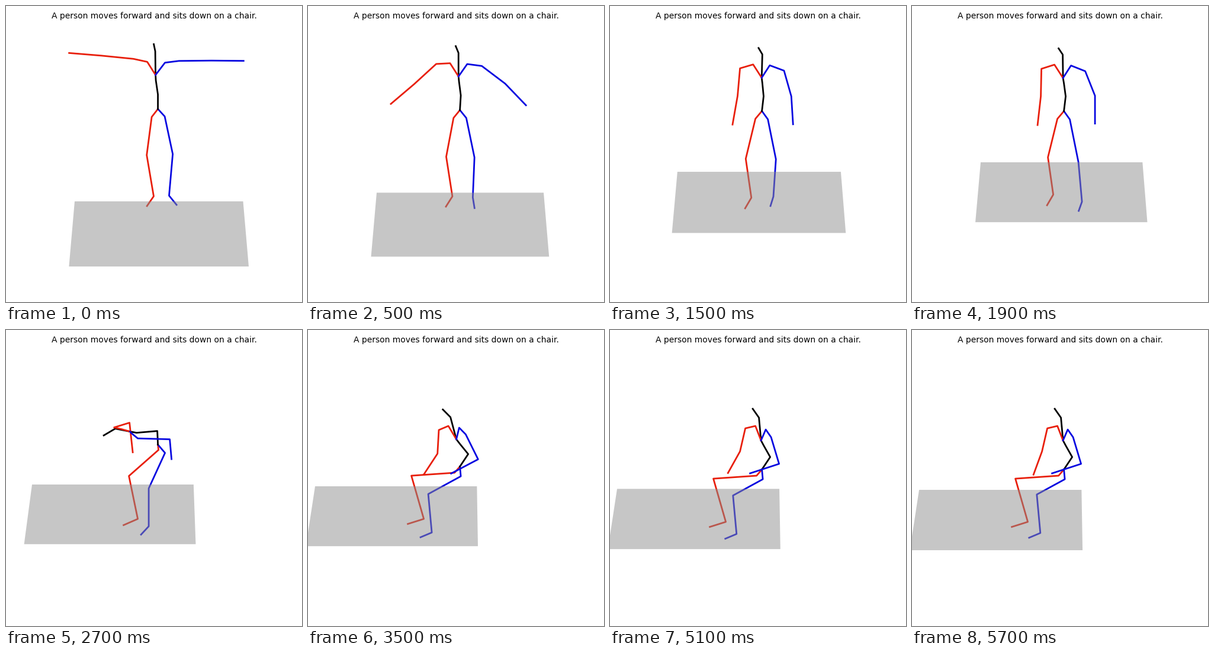
A matplotlib script for the animation above (5900 ms loop, 500x500 px).

```python
import matplotlib.pyplot as plt
import numpy as np
from matplotlib.animation import FuncAnimation

RED, BLUE, BLACK = "#e81e0a", "#0606e0", "black"
ROOT, CHEST = 0, 11
CHAINS = [
    ([ROOT, 1, 2, 3, 4], RED),
    ([ROOT, 5, 6, 7, 8], BLUE),
    ([ROOT, 9, 10, 11, 12, 13], BLACK),
    ([CHEST, 14, 15, 16, 17], RED),
    ([CHEST, 18, 19, 20, 21], BLUE),
]
LINKS = [link for chain, _ in CHAINS for link in zip(chain, chain[1:])]

# Bone columns, in chain order
R_LEG, L_LEG, SPINE, UPPER_BODY = slice(1, 3), slice(5, 7), slice(9, 13), slice(9, 21)
L_THIGH, L_SHIN, R_FOREARM, L_UPPER_ARM = 5, 6, 16, 19

STEPS = 30
t = np.arange(STEPS)


def ramp(start, end):
    return np.clip((t - start) / (end - start), 0, 1)


def smooth(u):
    return u * u * (3 - 2 * u)


def bump(center, half):
    return np.cos(np.pi / 2 * np.clip((t - center) / half, -1, 1)) ** 2


def mirrored(limb, roll):
    """Right and left limb from one left limb, both tilted by roll."""
    limb = np.array(limb)
    tilt = np.exp(1j * roll)
    return [*(-limb.conj() * tilt)], [*(limb * tilt)]


# A pose lists each bone as a step x + yj from its parent joint.
def spread():
    r_leg, l_leg = mirrored([11+13j, 11+64j, -9+70j, 12+16j], -0.04)
    r_arm, l_arm = mirrored([15-21.5j, 23.5-4j, 54.5-3j, 54.5-2j], 0.045)
    spine = [-24.5j, -3.5-24j, -0.5-9j, -0.5-40j, -2.5-12j]
    return r_leg + l_leg + spine + r_arm + l_arm


stand = [
    -11+13j, -16+65j, 9+63j, -10.5+18j,
    10+14j, 14.5+72j, 6+67j, -5.5+15.5j,
    3-25j, -3-22j, -1.5-9j, -0.5-39.5j, -7-10.5j,
    -14.5-22.5j, -22+7j, -1+46.5j, -5.5+48.5j,
    13.5-21j, 24+9.5j, 16.5+41.5j, 47j]
bend = [
    1+9j, -50+44j, 15+72.5j, -24+10.5j,
    12+14j, -27.5+60j, 64j, -13+14j,
    -1-23j, -35+3j, -11-2j, -25-5j, -19.5+11.5j,
    -14-4j, -13-3j, 26-8j, 5.5+50j,
    2+2.5j, 11+9j, 54+1.5j, 3+33.5j]
sit = [
    -9+10.5j, -73+5j, 21+73j, -27+8.5j,
    1.5+16.5j, -55+30j, 6+65j, -19+8j,
    14-21j, -11-19.5j, -4.5-8.5j, -3.5-38.5j, -10.5-15j,
    -9.5-24.5j, -17+4j, -9+39j, -28.5+30.5j,
    8-18.5j, 9+13j, 13.5+45j, -49+16j]

POSES = np.array([spread(), stand, bend, sit])
ROOT_Y = np.array([174, 177.6, 193.6, 235.6])

arms_down = 1 - (1 - ramp(0, 10)) ** 2
progress = arms_down + smooth(ramp(10, 14)) + smooth(ramp(14, 18))
stride = bump(6, 4)
slump = bump(18, 4)
settle = smooth(ramp(22, 29))


def blend(values):
    """Values of the four poses mixed along the progress curve."""
    i = np.minimum(progress.astype(int), len(values) - 2)
    u = progress - i
    u = u.reshape(-1, *[1] * (values.ndim - 1))
    return values[i] * (1 - u) + values[i + 1] * u


def animate_joints():
    angle = blend(np.unwrap(np.angle(POSES), axis=0))
    length = blend(np.abs(POSES))

    # Step forward: weight on the right leg, left leg lifted
    length[:, R_LEG] *= 1 + 0.08 * stride[:, None]
    length[:, L_LEG] *= 1 - 0.12 * stride[:, None]
    angle[:, SPINE] += 0.08 * stride[:, None]
    angle[:, [L_SHIN, L_UPPER_ARM]] += 0.3 * stride[:, None]

    # Slump on landing, then small shifts on the seat
    angle[:, UPPER_BODY] -= 0.17 * slump[:, None]
    angle[:, R_FOREARM] -= 0.4 * settle
    length[:, L_THIGH] *= 1 - 0.14 * settle

    bones = length * np.exp(1j * angle)
    joints = np.zeros((STEPS, len(LINKS) + 1), complex)
    joints[:, ROOT] = 256.6 + 1j * (blend(ROOT_Y) - 5 * slump)
    for n, (a, b) in enumerate(LINKS):
        joints[:, b] = joints[:, a] + bones[:, n]
    return joints


def floor_corners(left, top):
    """Near edge is the far edge scaled about the vanishing column."""
    rise = top - 262
    right = left + 273 + 0.169 * rise
    scale = 1.0625 + 0.00007 * rise
    bottom = 362.9 + 1.134 * rise
    near = [259 + scale * (x - 259) for x in (right, left)]
    return [(left, top), (right, top), (near[0], bottom), (near[1], bottom)]


joints = animate_joints()
floor_left = 116 - 8.5 * bump(6, 3) - 104 * (1 - (1 - ramp(10, 18)) ** 1.7)
floor_top = 330 - 66 * ramp(0, 10) ** 1.25 - 3 * bump(14, 4) + 6 * ramp(18, 29)

fig = plt.figure(figsize=(5, 5), dpi=100, facecolor="white")
ax = fig.add_axes([0, 0, 1, 1])
ax.set(xlim=(0, 500), ylim=(500, 0))
ax.axis("off")
fig.suptitle("A person moves forward and sits down on a chair.",
             fontsize=10, fontfamily="DejaVu Sans")

limbs = [ax.plot([], [], color=color, lw=2, zorder=2 + 0.1 * n)[0]
         for n, (_, color) in enumerate(CHAINS)]
floor = plt.Polygon(floor_corners(floor_left[0], floor_top[0]),
                    facecolor="#8e8e8e", alpha=0.5, linewidth=0, zorder=5)
ax.add_patch(floor)


def update(frame):
    k = (frame + 1) // 2
    for limb, (chain, _) in zip(limbs, CHAINS):
        points = joints[k, chain]
        limb.set_data(points.real, points.imag)
    floor.set_xy(floor_corners(floor_left[k], floor_top[k]))
    return [floor, *limbs]


anim = FuncAnimation(fig, update, frames=59, interval=100, repeat=True, repeat_delay=0)
plt.show()
```
